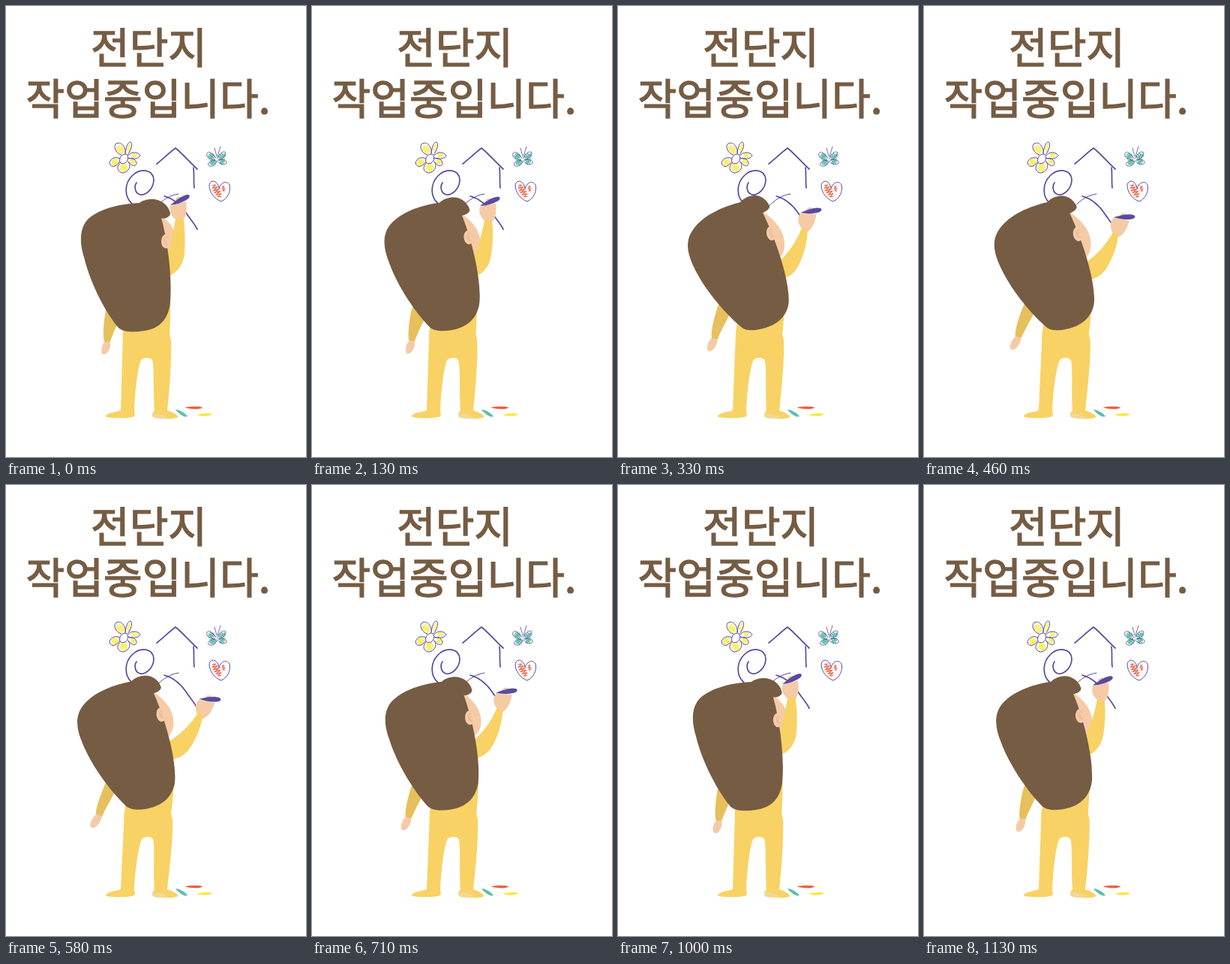
Animation of 400x600 px, one loop 1.18 s. Source, as an HTML page:

```html
<!DOCTYPE html>
<html lang="ko">
<head>
<meta charset="utf-8">
<title>전단지 작업중</title>
<style>
html, body { margin: 0; width: 100%; height: 100%; overflow: hidden; background: #fff; }
svg { display: block; width: 100%; height: 100%; }
text { font: 400 56.2px "Noto Sans CJK KR", "Noto Sans KR", sans-serif; fill: #755c43; stroke: #755c43; stroke-width: 1.4; text-anchor: middle; }
.line { fill: none; stroke: #5a4a9f; stroke-width: 1.7; stroke-linecap: round; stroke-linejoin: round; }
.thin { stroke-width: 1; }
.scribble { fill: none; stroke-width: 1.3; stroke-linejoin: round; }
.cloth { fill: #f8d264; }
.sleeve { fill: #e6c05c; }
.skin { fill: #f5cba6; }
.hair { fill: #755c43; }
.pen { fill: #5a4a9f; }
</style>
</head>
<body>
<svg viewBox="0 0 400 600">
  <text x="190.500" y="76">전단지</text>
  <text x="189.500" y="144">작업중입니다.</text>

  <g id="scribbles"></g>
  <g class="line thin">
    <!-- flower -->
    <path d="M154 198C147 197 143 188 146 184C151 179 160 185 159 196"/>
    <path d="M159 196C160 188 162 181 166 181C170 184 166 193 162 198"/>
    <path d="M163 199C167 193 176 194 179 199C176 204 169 204 163 202"/>
    <path d="M164 203C170 201 174 206 174 210C172 215 166 212 163 207"/>
    <path d="M163 207C168 213 163 222 155 222C147 220 148 213 152 209"/>
    <path d="M151 208C147 214 140 216 138 209C139 202 147 200 152 203"/>
    <path d="M152 208C150 202 154 197 160 197C164 200 163 206 159 209C156 210 153 210 152 208"/>
    <!-- heart -->
    <path d="M284 242C282 232 273 230 271 238C271 248 278 257 287 260C296 256 300 246 298 238C294 231 286 235 284 243"/>
  </g>
  <!-- butterfly -->
  <g class="line" style="stroke-width:.8">
    <path d="M280 203C276 196 270 192 268 196C266 202 273 205 279 205C272 206 268 209 270 212C274 215 280 212 281 206"/>
    <path d="M282 203C284 196 290 192 293 195C293 200 288 204 283 205C290 203 295 205 294 209C290 213 284 210 282 206"/>
    <path d="M281 200L278 189M282 200L286 187"/>
  </g>
  <g class="line">
    <path d="M201 210C210 203 219 194 226 189C236 197 245 208 255 217"/>
    <path d="M250 215C251 223 250 233 251 242"/>
    <path d="M168 263C157 253 158 236 168 226C179 215 196 217 197 231C197 243 187 252 179 251C171 249 171 239 174 235"/>
    <path class="thin" d="M196 271C205 262 215 252 230 250"/>
    <path d="M211 253C223 256 233 265 240 275C245 283 251 289 255 297"/>
  </g>

  <path fill="#5dbfa6" d="M226 537C230 536 240 542 242 546C237 548 230 542 226 537Z"/>
  <path fill="#ee5f43" d="M238 534C245 533 256 532 262 534C261 537 247 537 238 534Z"/>
  <path fill="#fbe52f" d="M254 544C260 542 270 541 275 543C272 546 260 546 254 544Z"/>

  <path id="backArm" class="sleeve"/>
  <path id="backHand" class="skin"/>
  <path id="pants" class="cloth"/>
  <path fill="#efd89a" d="M195 543C201 541 210 543 216 548C208 549.500 198 549 195 546Z"/>
  <path id="shirt" class="cloth"/>
  <path id="face" class="skin"/>
  <g id="hand">
    <ellipse class="skin" cx="230.500" cy="258" rx="4.500" ry="4"/>
    <path class="skin" d="M228 285C221 281 217 274 219 266L240 260C241 269 242 278 236 286C233 288 230 287 228 285Z"/>
    <path class="pen" d="M219 265C227 258 236 251 243 251C246 252 245 255 242 257C236 261 228 264 219 265Z"/>
  </g>
  <path id="arm" class="cloth"/>
  <path id="hair" class="hair"/>
  <g id="ear">
    <ellipse class="skin" rx="6.500" ry="9.500"/>
    <path d="M3 -4.500C0 -7 -3 -3 -2 1C-1 4 1 5 3 4M1 -2C-1 0 0 2 1 3" fill="none" stroke="#e5ac8a" stroke-width=".9"/>
  </g>
</svg>
<script>
const LOOP = 1180, LAST = 27;
const $ = id => document.getElementById(id);

// Rest and stretched outline of each flexible part
const shapes = {
  hair: [
    "M178 262C152 263 122 270 108 285C97 298 99 318 104 334C111 364 129 402 149 427C156 435 172 434 185 432C206 429 217 415 219 394C222 360 215 310 207 282C211 284 219 281 219 276C217 264 205 257 195 257C188 257 181 259 178 262Z",
    "M163 261C140 267 113 278 99 299C89 314 93 330 101 347C115 377 142 408 163 426C168 431 175 432 184 431C205 428 224 418 227.5 396C230 370 213 316 193 275C197 274 203 269 202 266C198 257 190 252 183 252C175 252 167 256 163 261Z"],
  face: [
    "M205 278C220 288 229 302 227 318C226 325 222 330 215 335Z",
    "M190 272C208 283 222 298 222 317C222 325 220 332 214 337Z"],
  arm: [
    "M226 283C229 281 235 282 237 285C239 300 239 318 238 330C236 345 228 355 217 359L214 335C217 325 222 310 226 283Z",
    "M256 303C258 302 262 306 262 309C260 322 253 340 243 353C236 361 228 364 219 366L216 342C231 333 245 320 256 303Z"],
  backArm: [
    "M140 390L133 405C130 420 129 440 131 446C134 450 138 449 139 446C142 438 145 430 150 420Z",
    "M140 385L133 396C126 412 120 428 120 437C120 442 125 444 128 441C132 432 140 418 150 400Z"],
  backHand: [
    "M131 447C128 451 126 457 128 462C131 466 136 462 138 456C140 452 139 449 138 447Z",
    "M120 438C115 443 111 450 113 455C116 458 121 455 124 450C127 446 128 443 127 440Z"],
  shirt: [
    "M165 400L157 420L156 442L218 440C219 425 219 410 219.5 395Z",
    "M167 400L160 420L157.5 442L219.5 440C222 425 223 412 224 395Z"],
  pants: [
    "M156 432L153 538C148 540 134 541 133 546C135 549 165 549 171 546C173 543 171 541 171 538C172 510 176 480 180 471C184 467 192 467 195 471C198 480 196 515 198 538C194 542 194 546 199 548C210 549 226 550 229 547C230 543 218 539 215 538C218 510 221 470 220 445L218 437Z",
    "M158 432L153 538C148 540 134 541 133 546C135 549 165 549 171 546C173 543 171 541 171 538C172 510 177 480 181 471C185 467 193 467 196 471C199 480 196 515 198 538C194 542 194 546 199 548C210 549 226 550 229 547C230 543 218 539 215 538C218 510 223 470 222 445L220 437Z"]
};

// Key steps at 24 steps per second
const keys = [0, 5, 8, 14, 20, 24, 27];
const motion = {
  head: [0, .78, 1, .72, .03, .02, .56],
  reach: [0, .25, .63, 1, .25, 0, .16],
  sway: [0, .28, .57, 1, .11, .04, .31]
};

const lerp = (a, b, k) => a + (b - a) * k;

function blend([a, b], k) {
  const ends = b.match(/[\d.]+/g);
  let i = 0;
  return a.replace(/[\d.]+/g, n => lerp(+n, +ends[i++], k).toFixed(2));
}

// Monotone cubic through the keys: extremes stay on the keys
function curve(values, x) {
  let k = 0;
  while (k < keys.length - 2 && x >= keys[k + 1]) k++;
  const secant = j => (values[j + 1] - values[j]) / (keys[j + 1] - keys[j]);
  const slope = j => {
    if (j === 0) return secant(0);
    if (j === keys.length - 1) return secant(j - 1);
    const p = secant(j - 1), q = secant(j);
    return p * q <= 0 ? 0 : 2 * p * q / (p + q);
  };
  const w = keys[k + 1] - keys[k], u = (x - keys[k]) / w, v = 1 - u;
  return values[k] * v * v * (1 + 2 * u) + values[k + 1] * u * u * (3 - 2 * u)
    + w * u * v * (slope(k) * v - slope(k + 1) * u);
}

// Crayon zigzag filling an ellipse
function scribble(color, cx, cy, rx, ry, turns, turn = 0) {
  let d = "";
  for (let i = 0; i <= turns; i++) {
    const t = lerp(-.93, .93, i / turns);
    const x = (i % 2 ? 1 : -1) * rx * Math.sqrt(1 - t * t);
    d += (i ? "L" : "M") + x.toFixed(1) + " " + (t * ry).toFixed(1);
  }
  return `<path class="scribble" stroke="${color}" d="${d}" transform="translate(${cx} ${cy}) rotate(${turn})"/>`;
}

const yellow = "#fbee4a", teal = "#62c0a6", red = "#f26a4b";
$("scribbles").innerHTML = [
  [yellow, 152, 191, 5, 5.5, 7, -50], [yellow, 164, 189, 2.5, 6, 6, 10],
  [yellow, 171, 199, 4, 3, 4, -50], [yellow, 169, 207, 3.5, 3.5, 5, -50],
  [yellow, 157, 215, 5.5, 5.5, 7, -50], [yellow, 145, 208, 5, 5, 7, -50],
  [teal, 274, 200, 4.5, 4, 7, 50], [teal, 288, 200, 4, 5, 7, 50],
  [teal, 276, 208, 4, 4.5, 7, 50], [teal, 288, 207, 3.5, 4, 6, 50],
  [red, 281, 246, 4, 10, 11, -30], [red, 290, 243, 1.8, 4, 5, -15]
].map(s => scribble(...s)).join("");

function draw(time) {
  let step = LAST;
  while (Math.round(step * 25 / 6) * 10 > time) step--;
  const head = curve(motion.head, step);
  const reach = curve(motion.reach, step);
  const sway = curve(motion.sway, step);
  const amount = { hair: head, face: head, arm: reach, backArm: sway, backHand: sway, shirt: sway, pants: sway };
  for (const id in shapes) $(id).setAttribute("d", blend(shapes[id], amount[id]));
  $("hand").setAttribute("transform",
    `translate(${34.5 * reach} ${24 * reach ** 1.3}) rotate(${28 * reach} 230 271)`);
  $("ear").setAttribute("transform",
    `translate(${lerp(213.5, 204.5, head)} ${lerp(313, 302.5, head)}) rotate(${-10 * head})`);
}

const start = performance.now();
function tick() {
  draw((performance.now() - start) % LOOP);
  requestAnimationFrame(tick);
}
tick();
</script>
</body>
</html>
```
